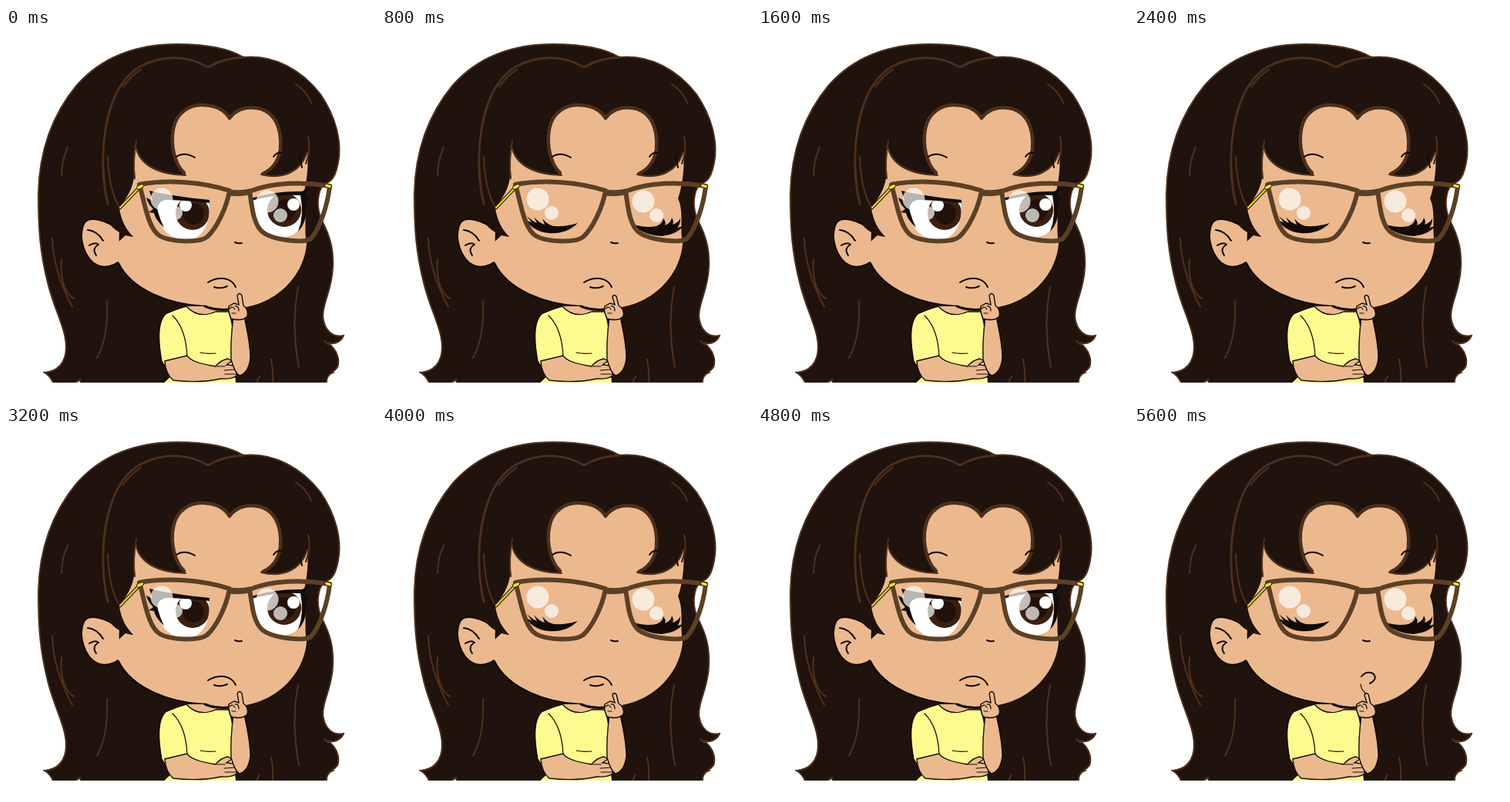
Recreate the animation shown at these times as an HTML page. Size 480x480 px, loop 6900 ms.

```html
<!DOCTYPE html>
<html lang="en">
<head>
<meta charset="utf-8">
<title>Thinking girl</title>
<style>
html, body { margin: 0; width: 100%; height: 100%; overflow: hidden; background: #fff; }
svg { display: block; width: 100vw; height: 100vh; }
.skin { fill: #ecb98f; }
.hair { fill: #20120c; }
.line { fill: none; stroke: #120a08; stroke-width: 2; stroke-linecap: round; stroke-linejoin: round; }
.thin { stroke-width: 1.2; }
.strand { fill: none; stroke: #4b2f1c; stroke-width: 2.2; stroke-linecap: round; stroke-linejoin: round; }
.ink { fill: #120a08; }
.frame { fill: none; stroke: #5b4026; stroke-width: 6; stroke-linejoin: round; }
</style>
</head>
<body>
<svg viewBox="0 0 480 480">
<defs>
  <clipPath id="stage"><path d="M41 20H439V460H41Z"/></clipPath>
  <clipPath id="leftEye"><path id="leftWhite" d="M195 221C215 219 240 224 263 225C266 245 260 265 246 272C229 279 210 272 202 257C197 247 195 235 195 221Z"/></clipPath>
  <clipPath id="rightEye"><path id="rightWhite" d="M318 222C335 218 362 214 384 215C390 238 386 260 373 268C357 275 338 271 328 258C321 248 318 236 318 222Z"/></clipPath>
</defs>
<g clip-path="url(#stage)">
  <!-- hair -->
  <path class="hair" stroke="#4b2f1c" stroke-width="2" d="M42 215C43 165 58 115 92 74C125 37 170 21 222 21C260 21 288 26 308 38C348 34 384 55 408 86C428 115 436 148 431 174C428 190 424 199 414 202C403 210 402 234 410 250C420 270 425 285 424 310C423 340 411 355 411 374C413 393 424 402 438 399C434 408 425 411 417 408C431 418 433 432 430 440C426 446 421 446 424 447C418 449 415 455 416 462H97L96 456L88 462H62C59 455 55 450 50 447C66 446 78 435 78 414C78 390 62 364 54 330C44 290 42 260 42 215Z"/>
  <g class="strand">
    <path stroke-width="3" d="M308 38C290 39 275 43 262 51C237 36 204 34 174 50C139 70 127 122 126 165C125 205 133 245 145 260"/>
    <path d="M175 54Q163 61 152 76M80 155Q72 172 72 191M132 166C133 193 137 219 149 235M72 300C70 325 76 344 88 351M60 272Q61 315 86 362M131 354C132 382 130 408 118 428M379 336C372 370 374 410 380 440M344 430Q347 445 346 460M376 73Q390 82 396 97M413 406Q420 413 417 409M329 452L325 460"/>
  </g>

  <!-- ear and face -->
  <path class="skin" stroke="#120a08" stroke-width="2" d="M148 262C130 250 108 242 101 254C93 272 102 300 119 308C129 312 140 308 147 303Z"/>
  <path class="line" d="M106 262Q118 263 126 276M108 282Q116 277 120 281Q111 286 117 295"/>
  <path class="skin" d="M168 150C170 176 194 192 234 191C221 181 214 156 217 132C220 110 238 99 258 100C275 101 285 108 290 118C297 108 310 101 326 104C350 108 358 132 357 157C354 175 345 186 330 190C360 198 384 187 391 160C393 182 389 208 384 221C392 239 386 260 390 279C388 318 352 364 290 364L258 361C214 357 165 342 146 305L143 280L155 269L165 271C154 259 146 245 147 233C160 217 168 200 166 185Z"/>
  <path class="hair" d="M129 244Q137 266 165 271Q151 258 147 234L128 228Z"/>
  <path class="line" d="M146 305C163 340 212 359 258 361"/>
  <path class="strand" d="M169 146Q164 174 167 195M392 141Q396 157 389 176"/>
  <path class="strand" style="stroke-width:4.5" d="M231 188C219 177 213 152 217 131C221 109 240 98 258 100C275 101 284 107 290 117C297 107 310 101 326 104C350 108 358 132 356 157C353 175 345 184 333 189"/>
  <path class="strand" d="M168 152C172 177 197 190 233 191M331 190C360 197 382 186 390 163"/>
  <path class="line" stroke-width="3" d="M221 167Q231 160 245 168M347 167Q351 161 357 162M381 166L384 181"/>
  <path class="line" d="M297 278Q301 280 306 279"/>

  <!-- open eyes -->
  <g id="open">
    <use href="#leftWhite" fill="#fff"/>
    <use href="#rightWhite" fill="#fff"/>
    <g clip-path="url(#leftEye)">
      <circle cx="242" cy="240" r="22" fill="#3b2011"/>
      <circle cx="243" cy="241" r="14" fill="#21110a"/>
      <circle cx="233" cy="230" r="8" fill="#fff"/>
    </g>
    <g clip-path="url(#rightEye)">
      <circle cx="361" cy="236" r="22" fill="#3b2011"/>
      <circle cx="362" cy="236" r="14" fill="#21110a"/>
      <circle cx="373" cy="229" r="8" fill="#fff"/>
    </g>
    <path class="ink" d="M186 211Q214 218 264 223L264 227Q225 223 207 223Q195 226 197 238Q200 249 205 259Q194 249 192 240L185 239L191 235Q184 228 182 220L190 224Z"/>
    <path class="ink" d="M318 221Q350 211 384 212L391 208L387 220L393 219L388 230Q392 250 379 264Q387 243 382 217Q350 215 318 224Z"/>
  </g>

  <!-- closed eyes -->
  <g id="closed">
    <path class="ink" d="M181 241Q187 251 194 252L188 244Q196 251 201 253L197 245Q204 253 211 255L208 247Q214 255 223 257Q239 258 254 253Q239 268 216 266Q193 264 181 241Z"/>
    <path class="ink" d="M324 254Q341 260 356 257Q364 254 365 247Q369 252 367 256Q375 253 376 246Q379 251 377 255Q384 253 387 247Q387 255 383 259L391 257Q382 268 363 270Q339 269 324 254Z"/>
  </g>

  <!-- glasses -->
  <g fill="#fff" fill-opacity=".7">
    <circle cx="202" cy="222" r="14.5"/><circle cx="220" cy="240" r="9"/>
    <circle cx="339" cy="225" r="14.5"/><circle cx="356" cy="243" r="9"/>
  </g>
  <path class="frame" d="M173 203C210 196 256 200 290 211C286 234 273 260 261 271C251 279 214 278 200 270C184 261 180 226 173 203Z"/>
  <path class="frame" d="M316 212C345 200 386 199 420 205C417 230 408 258 396 273C386 280 345 275 332 264C320 253 319 229 316 212Z"/>
  <path class="frame" style="stroke-width:8" d="M288 213Q303 216 318 212"/>
  <g stroke-linecap="round">
    <path d="M148 233L171 209" stroke="#251710" stroke-width="4.5"/>
    <path d="M148 233L171 209" stroke="#e6d634" stroke-width="2.2"/>
  </g>
  <g fill="#f1e232" stroke="#33250d">
    <ellipse cx="174" cy="206" rx="5" ry="2.4" transform="rotate(-25 174 206)"/>
    <ellipse cx="418" cy="205" rx="4.5" ry="2.4" transform="rotate(15 418 205)"/>
  </g>

  <!-- body -->
  <path class="skin" d="M234 361H290L287 384H245Z"/>
  <path class="line" style="stroke-width:3" d="M258 361Q273 367 290 365"/>
  <path fill="#fdfb8f" stroke="#120a08" stroke-width="1.3" d="M234 361Q249 378 272 368L289 368Q297 390 294 420L299 462H202L214 451L202 432C198 410 196 382 207 371Q219 365 234 361Z"/>
  <path class="line thin" d="M216 373Q233 389 235 425M252 421Q260 423 272 422"/>
  <path class="skin" stroke="#120a08" stroke-width="1.4" d="M206 432L235 425Q240 434 272 439Q278 431 288 429L293 432L286 437L297 438Q301 443 299 451Q293 456 279 455Q252 461 217 457Q207 449 206 432Z"/>
  <path class="line thin" d="M274 439L284 439M283 444L298 443M284 449L299 449"/>
  <path class="skin" stroke="#120a08" stroke-width="1.4" d="M295 375Q291 405 292 430Q297 448 303 451Q315 447 317 428Q317 410 309 374Z"/>
  <g id="pointing">
    <path class="skin" stroke="#120a08" stroke-width="1.4" d="M292 377Q288 368 289 361L296 357L302 359L300 347Q303 342 306 347L308 360Q315 365 313 374Q308 380 296 378Z"/>
    <path class="line thin" d="M290 364Q294 360 297 365M297 361Q302 360 302 367M293 370L298 370"/>
  </g>
  <g id="bent">
    <path class="skin" stroke="#120a08" stroke-width="1.4" d="M292 377Q287 367 289 361L296 357L302 359L299 349Q300 345 304 348L307 360Q315 365 313 374Q308 380 296 378Z"/>
    <path class="line thin" d="M290 364Q294 360 297 365M297 361Q302 360 302 367M293 370L298 370"/>
  </g>

  <!-- mouths -->
  <g id="frown">
    <path class="line" d="M262 330Q272 324 283 325Q294 327 298 336"/>
    <path class="line" d="M270 336Q278 339 287 335"/>
  </g>
  <g id="pout">
    <path class="line" d="M295 325Q301 317 310 321Q317 328 306 334"/>
    <path class="line thin" d="M294 335Q295 343 301 347"/>
  </g>
</g>
</svg>
<script>
const LOOP = 6900, BEAT = 800, LAST = 7;
const parts = {};
for (const id of ["open", "closed", "pointing", "bent", "frown", "pout"]) {
  parts[id] = document.getElementById(id);
}
const show = (id, on) => parts[id].setAttribute("display", on ? "inline" : "none");
const start = performance.now();

function draw(time) {
  const beat = Math.min(LAST, Math.floor(time / BEAT));
  const shut = beat % 2 === 1;
  const pout = beat === LAST;
  show("open", !shut);
  show("closed", shut);
  show("pointing", !shut);
  show("bent", shut);
  show("frown", !pout);
  show("pout", pout);
}

function tick() {
  draw((performance.now() - start) % LOOP);
  requestAnimationFrame(tick);
}
tick();
</script>
</body>
</html>
```
